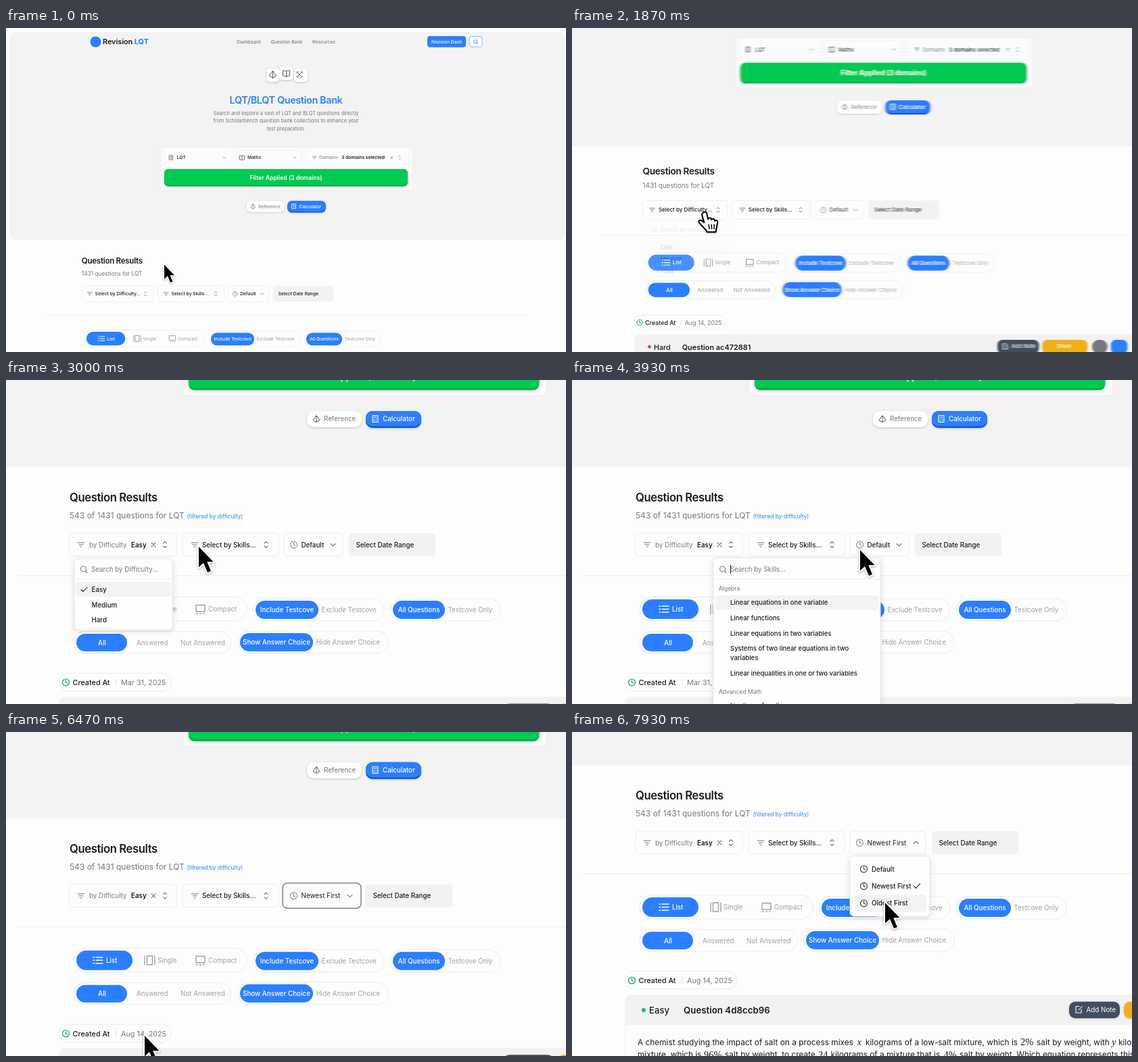
An HTML page for the animation above (8000 ms loop, 828 by 480 pixels).

```html
<!DOCTYPE html>
<html lang="en">
<head>
<meta charset="utf-8">
<title>Question bank</title>
<style>
html, body { margin: 0; width: 100%; height: 100%; overflow: hidden; background: #fdfdfd; }
svg { display: block; width: 100vw; height: 100vh; }
text { font-family: Inter, sans-serif; white-space: pre; }
.serif { font-family: "Liberation Serif", serif; }
.lift { filter: drop-shadow(0 1.5px 1.5px #0003); }
.menu { filter: drop-shadow(0 2px 4px #0002); }
#cursor { filter: drop-shadow(0 1px 1.5px #0005); }
</style>
</head>
<body>
<svg id="stage" viewBox="0 0 828 480" preserveAspectRatio="none"></svg>
<script>
const LOOP = 8000;
const BLUE = '#2b7fff', INK = '#1c1c1f', GREY = '#77777c', PALE = '#a0a0a5';
const WIDE = { scale: 1 / 1.44, x: 67 / 1.44, y: 323 / 1.44 };

// Moments of the story, in ms
const OPEN_DIFFICULTY = 1850, PICK_EASY = 2480, OPEN_SKILLS = 3220;
const OPEN_SORT = 4270, PICK_NEWEST = 5450, REOPEN_SORT = 7450;
const ZOOM = [1400, 2480], SCROLL = [6430, 6980], HAND = [1350, 2080];

const cursorPath = [
  [0, 270, 182], [450, 270, 182], [1450, 206, 248], [1980, 206, 248], [2330, 150, 311], [2560, 150, 311],
  [3000, 285, 247], [3200, 320, 246], [3480, 320, 246], [3930, 426, 252], [4200, 452, 246], [4500, 452, 246],
  [4950, 457, 313], [5550, 457, 313], [6300, 205, 450], [6850, 205, 450], [7350, 462, 166], [7520, 462, 166],
  [7930, 463, 253], [8000, 463, 254]
];

const clamp = v => Math.max(0, Math.min(1, v));
const smooth = v => { const u = clamp(v); return u * u * (3 - 2 * u); };
const progress = (t, [a, b]) => (t - a) / (b - a);

// ---- drawing helpers ----
const text = (x, y, str, { size = 9.8, w = 400, fill = INK, anchor = 'start', ls = 0, extra = '' } = {}) =>
  `<text x="${x}" y="${y + size * 0.36}" font-size="${size}" font-weight="${w}" fill="${fill}" text-anchor="${anchor}" letter-spacing="${ls}em" ${extra}>${str}</text>`;
const box = (x, y, x2, y2, r, fill = 'none', stroke = 'none', extra = '') =>
  `<rect x="${x}" y="${y}" width="${x2 - x}" height="${y2 - y}" rx="${r}" fill="${fill}" stroke="${stroke}" ${extra}/>`;
const span = (from, to, markup, fade = 0) =>
  `<g class="timed" data-from="${from}" data-to="${to}" data-fade="${fade}">${markup}</g>`;

const shapes = {
  filter: 'M-5 -3H5M-3 0H3M-1.2 3H1.2',
  updown: 'M-2.5 -2L0 -4.5L2.5 -2M-2.5 2L0 4.5L2.5 2',
  down: 'M-3.5 -1.5L0 2L3.5 -1.5',
  up: 'M-3.5 1.5L0 -2L3.5 1.5',
  cross: 'M-3 -3L3 3M3 -3L-3 3',
  check: 'M-4.5 0L-1.5 3L4.5 -3.5',
  search: 'M3.5 -.5A4 4 0 1 1 -4.5 -.5A4 4 0 1 1 3.5 -.5M2.5 2.5L5 5',
  clock: 'M5 0A5 5 0 1 1 -5 0A5 5 0 1 1 5 0M0 -3V0L2.2 1.2',
  list: 'M-7 -4.5H-5.5M-7 0H-5.5M-7 4.5H-5.5M-3 -4.5H7M-3 0H7M-3 4.5H7',
  single: 'M-4 -6.5H4V6.5H-4ZM-7.5 -6.5V6.5M7.5 -6.5V6.5',
  compact: 'M-6.5 -6H6.5V3.5H-6.5ZM-6 6.5H-4M-1 6.5H1M4 6.5H6',
  prism: 'M0 -5L5 2L0 5L-5 2ZM0 -5V5',
  calc: 'M-4 -5H4V5H-4ZM-2 -2.5H2M-2 .5H-1M1 .5H2M-2 2.8H-1M1 2.8H2',
  book: 'M0 -3C-2 -4.5 -4 -4 -5 -4V4C-4 4 -2 3.5 0 5C2 3.5 4 4 5 4V-4C4 -4 2 -4.5 0 -3V5',
  tools: 'M-4 -4L4 4M4 -4L-4 4M-5 -2L-2 -5M2 5L5 2M2 -5L5 -2M-5 2L-2 5',
  note: 'M1 -4.5H-4V5H4V0M0 1L5 -4.5'
};
const icon = (name, x, y, { size = 1, stroke = GREY, width = 1.1, extra = '' } = {}) =>
  `<path d="${shapes[name]}" transform="translate(${x} ${y}) scale(${size})" fill="none" stroke="${stroke}" stroke-width="${width}" stroke-linecap="round" stroke-linejoin="round" ${extra}/>`;

const selectBox = (x, x2) => box(x, 227, x2, 261, 5, '#fdfdfd', '#ececec');
const pill = (x, y, x2, y2) => box(x, y, x2, y2, (y2 - y) / 2, '#fdfdfd', '#ebebeb');
const toggle = (x, x2, y, split, on, off) => {
  const mid = y + 16.5;
  return pill(x, y, x2, y + 33) + box(x + 3.5, y + 3, split, y + 30, 13.5, BLUE) +
    text((x + 3.5 + split) / 2, mid, on, { fill: '#fff', w: 500, anchor: 'middle' }) +
    text(split + 4.5, mid, off, { fill: PALE });
};

// ---- page parts ----
const small = { size: 6.8 };
const hero = () => `<g transform="translate(-67 -323) scale(1.44)">
  ${box(5, 6, 827, 314, 10, '#f3f3f3')}
  <circle cx="132.5" cy="20.5" r="8" fill="${BLUE}"/>
  ${text(143, 20.5, `Revision <tspan fill="${BLUE}" font-weight="700">LQT</tspan>`, { size: 11, w: 600, ls: -0.01 })}
  ${text(341, 20.5, 'Dashboard', { ...small, fill: '#666' })}
  ${text(391.5, 20.5, 'Question Bank', { ...small, fill: '#666' })}
  ${text(453, 20.5, 'Resources', { ...small, fill: '#666' })}
  ${box(623, 12, 680, 28.5, 4, BLUE)}
  ${text(651.5, 20.5, 'Revision Dash', { ...small, w: 500, fill: '#fff', anchor: 'middle' })}
  ${box(685, 12.5, 704, 28, 4, '#fafcff', '#8dbbff')}
  ${icon('search', 694.5, 20.5, { size: .65, stroke: BLUE })}
  <g class="lift">${box(385, 60, 404, 80, 5, '#fff')}${box(426, 60, 446, 80, 5, '#fff')}${box(404, 57, 425, 77, 5, '#fff')}</g>
  ${icon('prism', 394.5, 69, { stroke: '#444', width: .9 })}
  ${icon('book', 414.5, 67, { stroke: '#444', width: .9 })}
  ${icon('tools', 434, 69, { stroke: '#444', width: .9 })}
  ${text(414, 107, 'LQT/BLQT Question Bank', { size: 14.4, w: 600, fill: BLUE, anchor: 'middle', ls: -0.025 })}
  ${['Search and explore a vast of LQT and BLQT questions directly',
     'from Scholarbench question bank collections to enhance your',
     'test preparation.'].map((s, i) => text(414, 126 + i * 11.7, s, { size: 7.35, fill: GREY, anchor: 'middle' })).join('')}
  ${box(228, 176.5, 602, 240.5, 5, '#fafafa', '#e9e9e9', 'stroke-width=".7"')}
  ${box(235, 181, 333, 203, 4, '#fcfcfc')}${box(339, 181, 436, 203, 4, '#fcfcfc', '#eee', 'stroke-width=".6"')}${box(445, 181, 594, 203, 4, '#fcfcfc')}
  ${icon('calc', 244, 192, { size: .65, stroke: '#555' })}${text(252.5, 192, 'LQT', { ...small, w: 500 })}${icon('down', 323, 192, { size: .6 })}
  ${icon('book', 349, 192, { size: .75, stroke: '#555' })}${text(357, 192, 'Maths', { ...small, w: 500 })}${icon('down', 427, 192, { size: .6 })}
  ${icon('filter', 456, 192, { size: .6 })}${text(463, 192, 'Domains', { ...small, fill: GREY })}
  ${text(496, 192, '3 domains selected', { ...small, w: 600 })}${icon('cross', 570, 192, { size: .6 })}${icon('updown', 582, 192, { size: .6 })}
  <g class="lift">${box(234, 209, 594, 234.5, 6, '#00a63e')}${box(234, 209, 594, 233, 6, '#00ca53')}</g>
  ${text(414, 221.5, 'Filter Applied (3 domains)', { size: 8.6, w: 600, fill: '#fff', anchor: 'middle' })}
  </g>
  <g class="lift">${box(445, 46, 526, 70, 10, '#fff')}${box(532, 46, 614, 71, 10, '#1457cf')}${box(532, 46, 614, 68.5, 10, BLUE)}</g>
  ${icon('prism', 459, 57.5)}${text(470, 57.5, 'Reference', { fill: GREY })}
  ${icon('calc', 546, 57.5, { stroke: '#fff' })}${text(557, 57.5, 'Calculator', { fill: '#fff', w: 500 })}`;

// The unset difficulty box is 5 units narrower, so its neighbours sit further left
const selectRow = () =>
  span(0, PICK_EASY, selectBox(94, 247) + icon('filter', 111, 244) +
    text(122.5, 244, 'Select by Difficulty...', { w: 500 }) + icon('updown', 230, 244) +
    `<g transform="translate(-5 0)">${otherSelects()}</g>`) +
  span(PICK_EASY, LOOP, selectBox(94, 252) + icon('filter', 111, 244) +
    text(123, 244, 'by Difficulty', { fill: GREY }) + text(185, 244, 'Easy', { w: 600 }) +
    icon('cross', 218, 244) + icon('updown', 235, 244) + otherSelects());
const otherSelects = () =>
  selectBox(261, 403) + icon('filter', 279, 244) + text(290, 244, 'Select by Skills...', { w: 500 }) + icon('updown', 384.5, 244) +
  `<g class="far">${sortSelect(0, PICK_NEWEST, 'Default', 498)}${sortSelect(PICK_NEWEST, LOOP, 'Newest First', 523)}</g>`;

const sortSelect = (from, to, label, right) => span(from, to,
  selectBox(411, right) + icon('clock', 425.5, 244, { extra: 'stroke-dasharray="2.4 1.4"' }) +
  text(436.5, 244, label, { w: label === 'Default' ? 500 : 400 }) + sortChevron(right - 14.5) +
  box(right + 9, 227, right + 137, 261, 5, '#f2f2f2') + text(right + 19.5, 244, 'Select Date Range', { w: 500 }));
const sortChevron = x =>
  span(0, OPEN_SORT, icon('down', x, 244)) + span(OPEN_SORT, PICK_NEWEST, icon('up', x, 244)) +
  span(PICK_NEWEST, REOPEN_SORT, icon('down', x, 244)) + span(REOPEN_SORT, LOOP, icon('up', x, 244));

const results = () => `
  ${text(94, 174, 'Question Results', { size: 16.7, w: 600, ls: -0.025 })}
  ${span(0, PICK_EASY, text(94, 200.5, '1431 questions for LQT', { size: 12, fill: GREY }))}
  ${span(PICK_EASY, LOOP, text(94, 200.5, '543 of 1431 questions for LQT', { size: 12, fill: GREY }) +
    text(267.5, 202, '(filtered by difficulty)', { size: 8.4, fill: BLUE }))}
  ${selectRow()}
  <path d="M17 290H1042" stroke="#e9e9e9"/>
  ${pill(100, 321.5, 356, 357)}${box(104, 325, 187, 354, 14.5, BLUE)}
  ${icon('list', 136, 339.5, { stroke: '#fff', width: 1.4 })}${text(148, 339.5, 'List', { w: 500, fill: '#fff' })}
  ${icon('single', 212.5, 339.5, { stroke: PALE, width: 1.4 })}${text(224, 339.5, 'Single', { fill: PALE })}
  ${icon('compact', 287.5, 339.5, { stroke: PALE, width: 1.4 })}${text(299, 339.5, 'Compact', { fill: PALE })}
  ${pill(100, 372.5, 333, 405)}${box(104, 376, 179, 402, 13, BLUE)}
  ${text(142, 389, 'All', { w: 500, fill: '#fff', anchor: 'middle' })}
  ${text(193, 389, 'Answered', { fill: PALE })}${text(258, 389, 'Not Answered', { fill: PALE })}
  <g class="far">
    ${toggle(365.5, 559, 324, 462, 'Include Testcove', 'Exclude Testcove')}
    ${toggle(568.5, 731, 324, 649, 'All Questions', 'Testcove Only')}
    ${toggle(342.5, 565, 372, 454, 'Show Answer Choice', 'Hide Answer Choice')}
  </g>
  ${pill(78, 434.5, 244, 461)}${icon('clock', 88.5, 448, { stroke: '#159a78', width: 1.2 })}
  ${text(98.5, 448, 'Created At', { size: 10.8, w: 500 })}<path d="M163 443V453" stroke="#e2e2e2"/>
  ${card(0, PICK_EASY, 'Aug 14, 2025', 'Hard', 'ac472881', '#b4573f')}
  ${card(PICK_EASY, PICK_NEWEST, 'Mar 31, 2025', 'Easy', '7be01f52', '#00c46a')}
  ${card(PICK_NEWEST, LOOP, 'Aug 14, 2025', 'Easy', '4d8ccb96', '#00c46a')}`;

const card = (from, to, date, level, id, color) => span(from, to, `
  ${text(170, 448, date, { size: 10.8, fill: GREY })}
  ${box(79, 470, 1060, 760, 8, '#fdfdfd', '#eee')}
  <path d="M79 514V478Q79 470 87 470H1060V514Z" fill="#f2f2f2"/>
  <circle cx="106" cy="492" r="3" fill="${color}"/>
  ${text(114, 492.5, level, { size: 13.2, w: 500 })}
  ${text(165, 492.5, 'Question ' + id, { size: 13.3, w: 600 })}
  <g class="far lift">${box(735, 479.5, 810, 504, 9, '#434d5e')}${icon('note', 749, 491, { stroke: '#fff' })}
    ${text(760.5, 491, 'Add Note', { fill: '#fff' })}
    ${box(816, 479.5, 898, 504, 9, '#efb015')}${text(842, 491, 'Share', { fill: '#fff' })}
    ${box(906, 479.5, 934, 504, 12, '#77777c')}${box(940, 479.5, 970, 504, 9, BLUE)}</g>
  ${problem()}`);

const problem = () => {
  const words = (x, y, s) => text(x, y, s, { size: 11.85 });
  const math = (x, y, s, style = 'normal') => text(x, y, s, { size: 14.5, extra: `class="serif" font-style="${style}"` });
  return words(97, 539.5, 'A chemist studying the impact of salt on a process mixes') + math(421.5, 539, 'x', 'italic') +
    words(434, 539.5, 'kilograms of a low-salt mixture, which is') + math(663, 539, '2%') +
    words(687, 539.5, 'salt by weight, with') + math(798, 539, 'y', 'italic') + words(808, 539.5, 'kilograms') +
    words(97, 558, 'mixture, which is') + math(195, 557.5, '96%') + words(226, 558, 'salt by weight, to create') +
    math(364, 557.5, '24') + words(382.5, 558, 'kilograms of a mixture that is') + math(549.5, 557.5, '4%') +
    words(573, 558, 'salt by weight. Which equation represents this situation?');
};

const panel = (x, y, x2, y2) => `<g class="menu">${box(x, y, x2, y2, 6, '#fefefe', '#e9e9e9')}</g>`;
const searchRow = (x, x2, label) =>
  icon('search', x + 14, 280.5) + text(x + 25, 280.5, label, { fill: GREY }) + `<path d="M${x} 295H${x2}" stroke="#eee"/>`;

const difficultyMenu = () => span(OPEN_DIFFICULTY, OPEN_SKILLS, panel(101, 265, 246, 370) + searchRow(101, 246, 'Search by Difficulty...') +
  box(103, 299, 244, 321, 4, '#f3f3f3') + span(PICK_EASY, LOOP, icon('check', 115.5, 310.5, { stroke: INK })) +
  ['Easy', 'Medium', 'Hard'].map((s, i) => text(126.5, 310.5 + i * 22.7, s, { w: 500 })).join(''), 150);

const skillsMenu = () => span(OPEN_SKILLS, OPEN_SORT, panel(209, 264, 456, 600) + searchRow(209, 456, 'Search by Skills...') +
  '<path d="M234.5 274V287" stroke="#222"/>' + box(212, 319, 453, 341, 4, '#f3f3f3') +
  text(217, 309, 'Algebra', { size: 8.5, fill: GREY }) + text(217, 462, 'Advanced Math', { size: 8.5, fill: GREY }) +
  [['Linear equations in one variable', 330], ['Linear functions', 353], ['Linear equations in two variables', 375.5],
   ['Systems of two linear equations in two', 398], ['variables', 412], ['Linear inequalities in one or two variables', 435],
   ['Nonlinear functions', 483]].map(([s, y]) => text(234, y, s, { size: 9.5, w: 500 })).join(''), 120);

const sortMenu = (from, to, chosen, switchAt) => {
  const row = i => 283 + i * 25.4;
  const hover = i => box(418, row(i) - 12.7, 524, row(i) + 12.7, 5, '#f3f3f3');
  return span(from, to, panel(411, 264, 529, 353) + span(from, switchAt, hover(chosen)) + span(switchAt, to, hover(chosen + 1)) +
    ['Default', 'Newest First', 'Oldest First'].map((s, i) =>
      icon('clock', 431.5, row(i), { stroke: '#333' }) + text(443, row(i), s, { w: 500 })).join('') +
    icon('check', 510, row(chosen), { stroke: INK }), 120);
};

const cursors = `
  <path id="arrow" d="M0 0V30.5L7 24L13 38L18 36L12.3 22.3H21.5Z" fill="#000" stroke="#fff" stroke-width="4" paint-order="stroke" stroke-linejoin="round"/>
  <g id="hand" stroke="#000" stroke-width="2.4" stroke-linejoin="round">
    <path d="M-3 1C1 -2 4 1 4 4L6 13C8 9 12 10 12 14C15 11 18 12 18 16C22 14 24 16 23 20L21 30L20 36H4L3 33C-2 28 -6 24 -10 19C-12 16 -9 13 -5 16L-1 19L-5 5C-5 3 -4 2 -3 1Z" fill="#fff"/>
    <path d="M7 22L8.5 31M12 22L13 31M17 22L17 31" stroke-width="1.8"/>
  </g>`;

const stage = document.getElementById('stage');
stage.innerHTML = `
  <filter id="streak" x="-5%" width="110%"><feGaussianBlur id="streakBlur" stdDeviation="0 0"/></filter>
  <rect width="828" height="480" fill="#fdfdfd"/>
  <g id="camera">
    <g id="page">
      <g class="far">${hero()}</g>
      ${results()}
      ${span(PICK_NEWEST, REOPEN_SORT, box(409, 225, 525, 262.5, 7, 'none', '#8a8a8a', 'stroke-width="1.6"'), 100)}
      ${difficultyMenu()}${skillsMenu()}
      ${sortMenu(OPEN_SORT, PICK_NEWEST, 0, 4780)}${sortMenu(REOPEN_SORT, LOOP, 1, 7750)}
    </g>
    <g id="cursor">${cursors}</g>
  </g>`;

const [camera, page, cursor, arrow, hand, streakBlur] =
  ['camera', 'page', 'cursor', 'arrow', 'hand', 'streakBlur'].map(id => document.getElementById(id));
const far = [...stage.querySelectorAll('.far')];
const timed = [...stage.querySelectorAll('.timed')].map(el =>
  ({ el, from: +el.dataset.from, to: +el.dataset.to, fade: +el.dataset.fade }));

function cursorAt(t) {
  const i = Math.max(1, cursorPath.findIndex(p => p[0] > t));
  const [a, ax, ay] = cursorPath[i - 1], [b, bx, by] = cursorPath[i];
  const u = smooth((t - a) / (b - a));
  return [ax + (bx - ax) * u, ay + (by - ay) * u];
}

function render(t) {
  const u = clamp(progress(t, ZOOM)), rest = 1 - smooth(u);
  const scale = 1 - (1 - WIDE.scale) * rest;
  // The vertical pan runs ahead of the zoom
  camera.setAttribute('transform', `translate(${WIDE.x * rest} ${WIDE.y * rest ** 2.25}) scale(${scale})`);
  page.setAttribute('transform', `translate(0 ${-80 * smooth(progress(t, SCROLL))})`);

  const speed = 4 * u * (1 - u);
  streakBlur.setAttribute('stdDeviation', `${2.1 * speed} ${0.4 * speed}`);
  for (const el of far) el.style.filter = speed > 0.02 ? 'url(#streak)' : '';

  cursor.setAttribute('transform', `translate(${cursorAt(t)})`);
  const pointing = t >= HAND[0] && t < HAND[1];
  hand.style.display = pointing ? '' : 'none';
  arrow.style.display = pointing ? 'none' : '';

  for (const { el, from, to, fade } of timed) {
    const on = t >= from && t < to;
    el.style.display = on ? '' : 'none';
    if (fade) el.style.opacity = clamp((t - from) / fade);
  }
}

const start = performance.now();
function tick() {
  render((performance.now() - start) % LOOP);
  requestAnimationFrame(tick);
}
tick();
</script>
</body>
</html>
```
